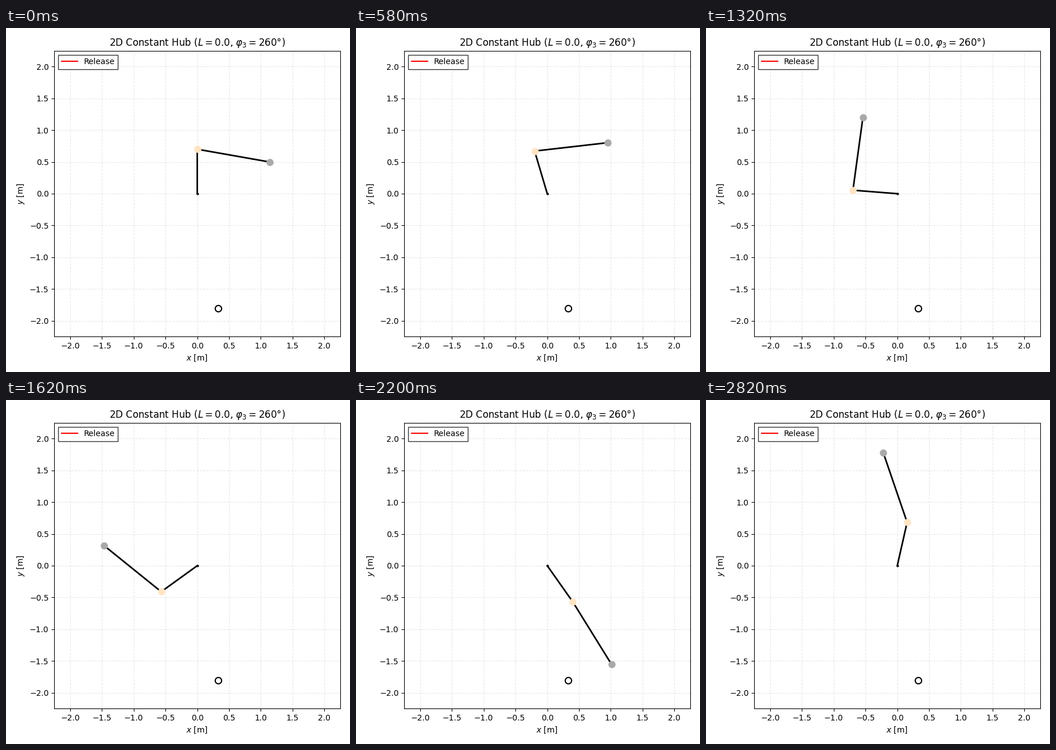
Write a matplotlib script that moves like this. It is 600 px wide and 600 px high and loops after 2840 ms.

```python
import numpy as np
import matplotlib.pyplot as plt
from matplotlib.animation import FuncAnimation

FRAMES, STEP = 142, 20          # frame count, ms per frame
ARM, CLUB = 0.7, 1.155          # segment lengths in m
COCK = -100.0                   # locked wrist angle in degrees
ACCEL = 98.2                    # hub acceleration while locked, deg/s^2
FREE = 0.8                      # time at which the wrist starts to open, s

# time (s), hub turn and rate, wrist angle and rate (deg, deg/s)
KEYS = np.array([
    (FREE, ACCEL * FREE**2 / 2, ACCEL * FREE, COCK, 0),
    (1.32, 85.5, 127, -93.3, 40),
    (1.62, 125.8, 142, -74.7, 86),
    (1.92, 170.4, 153, -41.9, 130),
    (2.20, 215.2, 170, -3.4, 138),
    (2.70, 317.1, 240, 35.7, -4),
    (2.82, 347.2, 263, 31.7, -64),
])


def hermite(t, val, rate):
    """Cubic Hermite curve through the key poses."""
    times = KEYS[:, 0]
    i = int(np.clip(np.searchsorted(times, t) - 1, 0, len(times) - 2))
    h = times[i + 1] - times[i]
    u = (t - times[i]) / h
    rise = u * u * (3 - 2 * u)
    return (val[i] * (1 - rise) + val[i + 1] * rise
            + h * u * (1 - u) * ((1 - u) * rate[i] - u * rate[i + 1]))


def angles(t):
    """Directions of arm and club in radians."""
    if t <= FREE:
        turn, wrist = ACCEL * t * t / 2, COCK
    else:
        turn = hermite(t, KEYS[:, 1], KEYS[:, 2])
        wrist = hermite(t, KEYS[:, 3], KEYS[:, 4])
    return np.radians(90 + turn), np.radians(90 + turn + wrist)


fig = plt.figure(figsize=(6, 6), dpi=100)
ax = fig.add_axes([84.3 / 600, 61.7 / 600, 498.6 / 600, 498.6 / 600])
ax.set(xlim=(-2.25, 2.25), ylim=(-2.25, 2.25),
       xlabel="$x$ [m]", ylabel="$y$ [m]",
       title=r"2D Constant Hub ($L = 0.0$, $\varphi_3 = 260$°)")
ticks = np.arange(-2, 2.1, 0.5)
ax.set_xticks(ticks)
ax.set_yticks(ticks)
ax.grid(color="lightgray", linestyle="--", alpha=0.5)

ax.plot([], [], color="red", label="Release")
ax.plot(0.33, -1.808, "o", ms=8, mew=1.5, mfc="none", mec="black")
ax.plot(0, 0, "o", ms=2, color="black")
rods, = ax.plot([], [], color="black", lw=2)
wrist_dot, = ax.plot([], [], "o", ms=8, color="bisque")
head_dot, = ax.plot([], [], "o", ms=8, color="darkgray")
ax.legend(loc="upper left", fancybox=False, edgecolor="black")


def update(frame):
    a, c = angles(frame * STEP / 1000)
    wx, wy = ARM * np.cos(a), ARM * np.sin(a)
    hx, hy = wx + CLUB * np.cos(c), wy + CLUB * np.sin(c)
    rods.set_data([0, wx, hx], [0, wy, hy])
    wrist_dot.set_data([wx], [wy])
    head_dot.set_data([hx], [hy])
    return rods, wrist_dot, head_dot


anim = FuncAnimation(fig, update, frames=FRAMES, interval=STEP,
                     repeat=True, repeat_delay=0)
plt.show()
```
